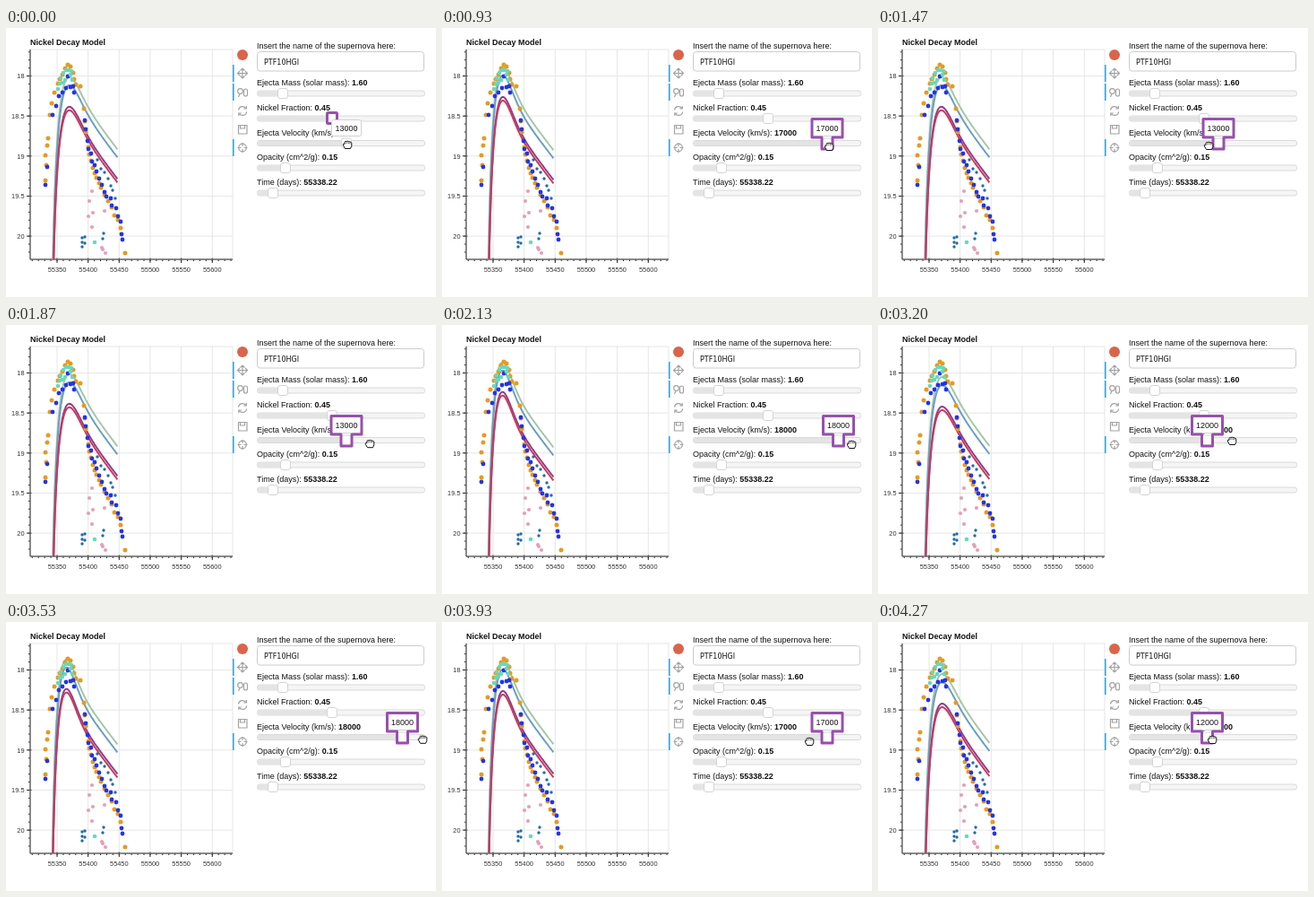
Recreate the animation shown at these times as an HTML page. Size 480 by 300 pixels, loop 4340 ms.

```html
<!DOCTYPE html>
<html lang="en">
<head>
<meta charset="utf-8">
<title>Nickel Decay Model</title>
<style>
  html, body { margin: 0; width: 100%; height: 100%; overflow: hidden; background: #fff; }
  svg { display: block; width: 480px; height: 300px; }
  text { font-family: "Liberation Sans", Arial, sans-serif; font-size: 9px; fill: #111; }
  .bold { font-weight: bold; }
  .tick { font-size: 7.4px; fill: #333; }
  .grid { stroke: #e6e6e6; }
  .axis { stroke: #222; }
  .curve { fill: none; stroke-width: 2; stroke-linejoin: round; }
  .icon { fill: none; stroke: #a3a3a3; stroke-width: 1.2; }
  .track { fill: #f5f5f5; stroke: #d9d9d9; }
  .bar { fill: #e4e4e4; }
  .handle { fill: #fff; stroke: #d4d4d4; }
  .ring { fill: none; stroke: #9850ac; stroke-width: 3; stroke-linejoin: round; }
</style>
</head>
<body>
<svg viewBox="0 0 480 300">
  <clipPath id="area"><rect x="27" y="24" width="226" height="234"/></clipPath>
  <text class="bold" x="27" y="19">Nickel Decay Model</text>
  <g id="axes"></g>
  <g clip-path="url(#area)">
    <g id="curves"></g>
    <g id="dots"></g>
  </g>

  <circle cx="264" cy="30" r="6" fill="#d9644a"/>
  <path d="M253.8 41v19M253.8 62v19M253.8 124v19" stroke="#35a5dc" stroke-width="1.6"/>
  <g class="icon">
    <path d="M259 50.5h10M264 45.5v10M261 48l-2.500 2.500 2.500 2.500M267 48l2.500 2.500-2.500 2.500M261.500 47.500l2.500-2.500 2.500 2.500M261.500 53.500l2.500 2.500 2.500-2.500"/>
    <circle cx="261.500" cy="70.500" r="2.800"/>
    <path d="M261 73.500l-1.500 3.500"/>
    <rect x="265.500" y="68" width="4" height="8" rx="2"/>
    <path d="M259.500 91.500a4.600 4.600 0 0 1 8.300-2M268.700 93.500a4.600 4.600 0 0 1-8.300 2M268.300 87v3h-3M259.800 98v-3h3"/>
    <path d="M259.500 108.500h9.500v9.500h-9.500zM261.500 108.500v3.500h5v-3.500"/>
    <circle cx="264" cy="133.500" r="4.300"/>
    <path d="M264 128v4M264 135v4M258.500 133.500h4M265.500 133.500h4"/>
  </g>

  <text x="280" y="23">Insert the name of the supernova here:</text>
  <rect x="280.500" y="26.500" width="186" height="21.500" rx="3" fill="#fff" stroke="#ccc"/>
  <text x="288" y="41" style="font:8px 'DejaVu Sans',sans-serif">PTF10HGI</text>
  <g id="sliders"></g>

  <rect id="oldRing" class="ring" x="358.500" y="94.500" width="11" height="12" rx="1"/>
  <g id="tip">
    <rect x="-16.500" y="102.500" width="33" height="18" rx="2" fill="#fff" stroke="#d0d0d0"/>
    <path id="newRing" class="ring" d="M-17 101.500H17V122H6V135H-6V122H-17Z"/>
    <text id="tipText" y="115" text-anchor="middle"></text>
  </g>
  <g id="hand" stroke="#111" stroke-width="1" stroke-linejoin="round" fill="#fff">
    <path d="M-2.500 4.500L-4.500 1C-5.500-.5-4-1.500-3-.5V-2.500C-3-4-1.200-4-1-3C-.8-4.300 1-4.300 1.200-3C1.500-4 3-3.800 3-2.500C3.500-3.300 4.800-2.800 4.800-1.500V1.500L3.500 4.500Z"/>
    <path d="M-1-2.800v2M1.200-2.800v2M3-2.300v1.500" fill="none" stroke-width=".7"/>
  </g>
</svg>
<script>
const $ = id => document.getElementById(id);
const STEP = 1000 / 15, LOOP = 4340, LAST = 64;

function add(parent, tag, attrs, content = '') {
  const el = document.createElementNS('http://www.w3.org/2000/svg', tag);
  for (const key in attrs) el.setAttribute(key, attrs[key]);
  el.textContent = content;
  return parent.appendChild(el);
}
const line = (cls, x1, y1, x2, y2) => add($('axes'), 'line', { class: cls, x1, y1, x2, y2 });

function drawAxes() {
  const xAt = i => 57 + 34.65 * i, yAt = i => 53.5 + 44.65 * i;
  for (let i = 0; i < 6; i++) {
    line('grid', xAt(i), 24, xAt(i), 258);
    line('axis', xAt(i), 256.5, xAt(i), 262);
    add($('axes'), 'text', { class: 'tick', x: xAt(i), y: 271.5, 'text-anchor': 'middle' }, 55350 + 50 * i);
  }
  for (let i = 0; i < 5; i++) {
    line('grid', 27, yAt(i), 253, yAt(i));
    line('axis', 23, yAt(i), 28.5, yAt(i));
    add($('axes'), 'text', { class: 'tick', x: 20.5, y: yAt(i) + 2.7, 'text-anchor': 'end' }, 18 + i / 2);
  }
  for (let i = -4; i < 29; i++) line('axis', xAt(i / 5), 258, xAt(i / 5), 260);
  for (let i = -3; i < 23; i++) line('axis', 25, yAt(i / 5), 27, yAt(i / 5));
  add($('axes'), 'rect', { x: 27, y: 24, width: 226, height: 234, fill: 'none', stroke: '#e5e5e5' });
  line('axis', 27, 24, 27, 258);
  line('axis', 27, 258, 253, 258);
}

function drawDots(color, radius, points) {
  for (const point of points.split(' ')) {
    const [cx, cy] = point.split(',');
    add($('dots'), 'circle', { cx, cy, r: radius, fill: color });
  }
}

drawAxes();
drawDots('#e3a0b9', 2.1, '93,193 96,182 97,206 92,210 96,222 107,245 108,247 111,251 110,204');
drawDots('#246ca5', 1.7, '85,234 88,233 85,239 88,240 85,244 102,147 106,157 110,161 114,168 117,176 119,181 122,190 109,229 108,235');
drawDots('#e69a20', 2.5, '51,84 54,72 49,97 47,123 46,131 44,142 45,153 44,170 58,62 60,57 63,52 66,45 69,41 72,43 75,50 76,57 78,63 83,65 87,90 88,104 89,116 92,133 93,141 95,148 97,156 99,162 101,167 104,173 106,178 110,186 114,193 118,200 121,209 125,214 128,223 133,251');
drawDots('#2434e4', 2.4, '44,175 46,155 52,97 56,87 59,76 63,72 67,67 69,54 72,66 75,65 76,72 88,103 89,113 91,126 92,135 95,140 96,149 99,153 101,160 104,168 107,175 110,183 112,188 117,190 118,198 123,201 125,210 128,216 129,230 130,236');
drawDots('#66d9bd', 2.3, '58,68 60,62 61,56 64,50 66,58 67,47 70,47 72,52 74,58 73,48 63,61 99,239');

// Radioactive heating by nickel and cobalt, t in days.
const heating = t => 3.222 * Math.exp(-t / 8.8) + 0.678 * Math.exp(-t / 111.3);

// Diffusion light curve as [x, log10 luminosity] pairs.
function lightCurve(velocity) {
  const tau = 29 * Math.sqrt(13 / velocity), dt = 0.5, curve = [];
  let sum = 0;
  for (let t = dt; t <= 108.5; t += dt) {
    const mid = t - dt / 2;
    sum += 2 * mid / tau ** 2 * Math.exp((mid / tau) ** 2) * heating(mid) * dt;
    curve.push([49.2 + t * 0.693, Math.log10(sum) - (t / tau) ** 2 * Math.LOG10E]);
  }
  return curve;
}

const bands = [['#a5c6a9', 6.5], ['#6b9ebf', 15.5], ['#963b87', 39.5], ['#c43c5b', 43.5]].map(([stroke, base]) =>
  ({ base, el: add($('curves'), 'path', { class: 'curve', stroke }) }));

function drawCurves(velocity) {
  const curve = lightCurve(velocity);
  for (const { base, el } of bands)
    el.setAttribute('d', 'M' + curve.map(([x, lum]) => x.toFixed(1) + ' ' + (base - 223.5 * lum).toFixed(1)).join('L'));
}

function makeSlider(label, value, y, x) {
  const group = $('sliders');
  const text = add(group, 'text', { x: 280, y: y - 9 }, label + ': ');
  const number = add(text, 'tspan', { class: 'bold' }, value);
  add(group, 'rect', { class: 'track', x: 280.5, y: y - 3, width: 187, height: 6, rx: 2.5 });
  const bar = add(group, 'rect', { class: 'bar', x: 281, y: y - 2.5, width: x - 281, height: 5, rx: 2 });
  const handle = add(group, 'rect', { class: 'handle', x: x - 5.5, y: y - 5.5, width: 11, height: 11, rx: 2.5 });
  return { number, bar, handle };
}
makeSlider('Ejecta Mass (solar mass)', '1.60', 73, 309);
makeSlider('Nickel Fraction', '0.45', 101, 364);
const speed = makeSlider('Ejecta Velocity (km/s)', '13000', 128.5, 380);
makeSlider('Opacity (cm^2/g)', '0.15', 156, 312);
makeSlider('Time (days)', '55338.22', 184, 298);

// Keys hold [step, value].
const velocityKeys = [[0, 13], [7, 13], [14, 17], [16, 17], [22, 13], [25, 12], [27, 12], [32, 18], [34, 19],
  [36, 19], [39, 17], [46, 12], [48, 12], [54, 19], [56, 19], [59, 17], [63, 13], [64, 12]];
const cursorX = [[0, 381], [7, 381], [14, 432], [16, 434], [22, 369], [25, 363], [31, 449], [32, 457], [34, 466],
  [36, 460], [39, 423], [45, 370], [48, 395], [53, 465], [55, 463], [59, 410], [64, 373]];
const cursorY = [[0, 130], [7, 130], [14, 132], [22, 131], [32, 133], [48, 129], [59, 133], [64, 131]];

function sample(keys, step) {
  const i = Math.max(1, keys.findIndex(key => key[0] >= step));
  const [s0, v0] = keys[i - 1], [s1, v1] = keys[i];
  return v0 + (v1 - v0) * (step - s0) / (s1 - s0);
}

let shownVelocity, shownStep;

function render(time) {
  const step = Math.min(LAST, Math.floor((time % LOOP + 4) / STEP));
  if (step !== shownStep) {
    shownStep = step;
    const velocity = Math.round(sample(velocityKeys, step));
    if (velocity !== shownVelocity) {
      shownVelocity = velocity;
      const x = 280 + (velocity - 5) * 12.5;
      speed.number.textContent = $('tipText').textContent = velocity * 1000;
      speed.bar.setAttribute('width', x - 281);
      speed.handle.setAttribute('x', x - 5.5);
      $('tip').setAttribute('transform', `translate(${x} 0)`);
      drawCurves(velocity);
    }
    const focus = Math.min(1, Math.max(0, (step - 3) / 2));
    $('oldRing').setAttribute('opacity', 1 - focus);
    $('newRing').setAttribute('opacity', focus);
    $('hand').setAttribute('transform', `translate(${sample(cursorX, step)} ${sample(cursorY, step)})`);
  }
}

const start = performance.now();
function tick() {
  render(performance.now() - start);
  requestAnimationFrame(tick);
}
tick();
</script>
</body>
</html>
```
